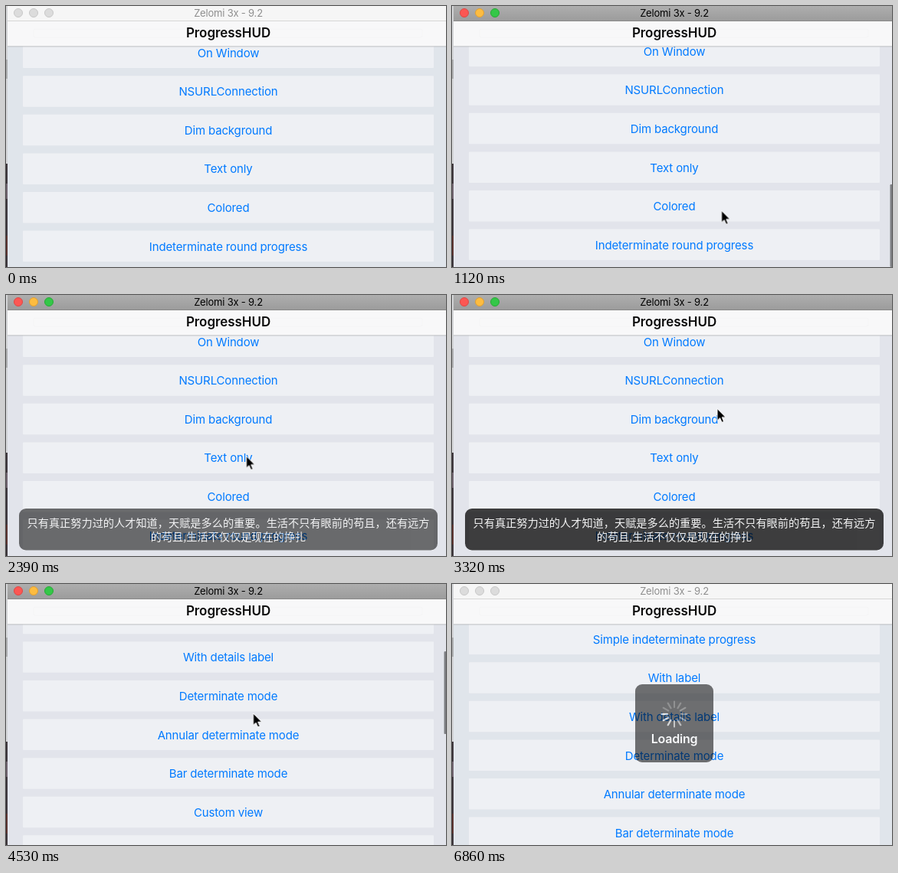
These frames come from a looping animation (574x341 px, 6960 ms). An HTML page:

```html
<!DOCTYPE html>
<html lang="en">
<head>
<meta charset="utf-8">
<title>ProgressHUD</title>
<style>
html, body { margin: 0; width: 100%; height: 100%; overflow: hidden; }
svg { display: block; width: 574px; height: 341px; font-family: Inter, sans-serif; }
text { text-anchor: middle; }
.anim { animation: 6960ms linear infinite; }

#list text { font-size: 15px; letter-spacing: -.14px; fill: #007aff; }
#list rect { fill: #eef0f4; }
#list { animation-name: scroll; }
#bar { animation-name: bar; }
#thumb { animation-name: thumb; }
#cursor { animation-name: cursor; }
#toast { animation-name: toast; }
#loading { animation-name: loading; }
.active { animation-name: active; }
#spinner { animation-name: spin; animation-timing-function: steps(84); }
#spinner line { stroke: #fff; stroke-width: 2.2; stroke-linecap: round; }

.title { font-size: 13px; letter-spacing: -.2px; }
.nav { font-size: 17px; font-weight: 600; letter-spacing: -.06px; fill: #0a0a0a; }
.label { font-size: 16px; font-weight: 600; letter-spacing: -.22px; fill: #fff; }
.zh { font: 14.2px "Noto Sans CJK SC", "Noto Sans CJK", sans-serif; fill: #f4f4f4; }

@keyframes scroll {
  0%, 8.62% { transform: translateY(-466.4px); }
  11.35% { transform: translateY(-468px); }
  13.22% { transform: translateY(-469.5px); animation-timing-function: ease-in-out; }
  20.11% { transform: translateY(-466.4px); }
  58.33% { transform: translateY(-466.4px); animation-timing-function: cubic-bezier(.35,.1,.7,.75); }
  65.09% { transform: translateY(-78px); animation-timing-function: cubic-bezier(.33,.67,.6,1); }
  68.25%, 100% { transform: none; }
}
@keyframes thumb {
  0%, 58.33% { transform: translateY(173px); animation-timing-function: cubic-bezier(.35,.1,.7,.75); }
  65.09% { transform: translateY(28.5px); animation-timing-function: cubic-bezier(.33,.67,.6,1); }
  68.25%, 100% { transform: none; }
}
@keyframes bar {
  0%, 8.62% { opacity: 0; }
  10.06%, 21.55% { opacity: 1; }
  25%, 58.1% { opacity: 0; }
  58.5%, 73.42% { opacity: 1; }
  76.58%, 100% { opacity: 0; }
}
@keyframes cursor {
  0%, 5.6% { transform: translate(470px, 360px); animation-timing-function: ease-out; }
  11.35% { transform: translate(355px, 272.5px); }
  15.37% { transform: translate(352px, 268px); animation-timing-function: ease-in-out; }
  25%, 37.36% { transform: translate(313.5px, 210.5px); animation-timing-function: ease-in-out; }
  44.4%, 51.72% { transform: translate(346px, 148.5px); animation-timing-function: ease-in-out; }
  57.6% { transform: translate(338px, 141px); animation-timing-function: ease-in-out; }
  65.09% { transform: translate(322.5px, 169px); animation-timing-function: ease-in-out; }
  68.25%, 73.42% { transform: translate(321px, 148px); animation-timing-function: ease-in-out; }
  76.58%, 78.6% { transform: translate(315px, 132px); }
  80.89%, 82.9% { transform: translate(315px, 123px); }
  85.2% { transform: translate(349px, 153px); animation-timing-function: ease-out; }
  92.82% { transform: translate(402px, 254px); animation-timing-function: ease-in; }
  95.11%, 100% { transform: translate(430px, 360px); }
}
@keyframes active {
  0%, 8.62% { opacity: 0; }
  8.63%, 96.84% { opacity: 1; }
  96.85%, 100% { opacity: 0; }
}
@keyframes toast {
  0%, 32.33% { opacity: 0; animation-timing-function: ease-in-out; }
  35.6%, 46.98% { opacity: 1; animation-timing-function: ease-in-out; }
  51%, 100% { opacity: 0; }
}
@keyframes loading {
  0%, 83.33% { opacity: 0; animation-timing-function: ease-in-out; }
  87.1%, 97.05% { opacity: 1; }
  98.56%, 100% { opacity: .68; }
}
@keyframes spin {
  from { transform: rotate(330deg); }
  to { transform: rotate(2850deg); }
}
</style>
</head>
<body>
<svg viewBox="0 0 574 341">
  <defs>
    <linearGradient id="chrome" x2="0" y2="1">
      <stop stop-color="#aeaeae"/><stop offset="1" stop-color="#9b9b9b"/>
    </linearGradient>
  </defs>

  <rect width="574" height="341" fill="#e0e5eb"/>
  <rect class="anim active" width="574" height="341" fill="#e2e4eb"/>
  <g id="list" class="anim"></g>
  <g id="bar" class="anim">
    <rect id="thumb" class="anim" x="571.5" y="60" width="3" height="108" rx="1.3" fill="#7d7e82"/>
  </g>

  <rect y="20" width="574" height="32.5" fill="#f8f8f9"/>
  <rect x="36" y="30" width="507" height="11" rx="2" fill="none" stroke="#f5f5f6"/>
  <rect y="52.4" width="574" height="1" fill="#bfc0c3"/>
  <text class="nav" x="290" y="41.3">ProgressHUD</text>

  <rect width="574" height="20" fill="#f6f6f6"/>
  <rect y="19" width="574" height="1" fill="#d6d6d6"/>
  <g fill="#dcdcdc" stroke="#c8c8c8">
    <circle cx="16" cy="9" r="5.5"/><circle cx="36" cy="9" r="5.5"/><circle cx="56" cy="9" r="5.5"/>
  </g>
  <text class="title" x="290" y="14" fill="#8e8e8e">Zelomi 3x - 9.2</text>
  <g class="anim active">
    <rect width="574" height="20" fill="url(#chrome)"/>
    <rect y="19" width="574" height="1" fill="#898989"/>
    <circle cx="16" cy="9" r="5.5" fill="#fc5753" stroke="#df4744"/>
    <circle cx="36" cy="9" r="5.5" fill="#fdbc40" stroke="#de9f34"/>
    <circle cx="56" cy="9" r="5.5" fill="#34c748" stroke="#27aa35"/>
    <text class="title" x="290" y="14" fill="#000">Zelomi 3x - 9.2</text>
  </g>

  <!-- desktop showing beside the window -->
  <rect width="2" height="206" fill="#d2d3d5"/>
  <rect y="70" width="2" height="25" fill="#aaabad"/>
  <rect y="206" width="2" height="135" fill="#3b3439"/>
  <rect y="232" width="2" height="20" fill="#6b5f69"/>
  <rect y="300" width="2" height="26" fill="#57302c"/>

  <g id="toast" class="anim">
    <rect x="17" y="279" width="546" height="54.5" rx="9" fill="#000" fill-opacity=".8"/>
    <text class="zh" lang="zh" x="290" y="303.3">只有真正努力过的人才知道，天赋是多么的重要。生活不只有眼前的苟且，还有远方</text>
    <text class="zh" lang="zh" x="290" y="321">的苟且,生活不仅仅是现在的挣扎</text>
  </g>

  <g id="loading" class="anim">
    <rect x="239" y="131" width="102" height="102" rx="9" fill="#000" fill-opacity=".8"/>
    <g transform="translate(290 170)"><g id="spinner" class="anim"></g></g>
    <text class="label" x="290" y="208.4">Loading</text>
  </g>

  <path id="cursor" class="anim" d="M0 0V15.5L3.6 12.2L6 17.8L8.6 16.7L6.2 11.2H11Z" fill="#000" stroke="#fff"/>
</svg>
<script>
const labels = [
  'Simple indeterminate progress', 'With label', 'With details label', 'Determinate mode',
  'Annular determinate mode', 'Bar determinate mode', 'Custom view', 'Mode switching',
  'Using blocks', 'On Window', 'NSURLConnection', 'Dim background', 'Text only', 'Colored',
  'Indeterminate round progress'
];

function add(parent, tag, attrs, text = '') {
  const el = document.createElementNS('http://www.w3.org/2000/svg', tag);
  for (const key in attrs) el.setAttribute(key, attrs[key]);
  el.textContent = text;
  parent.append(el);
}

const list = document.getElementById('list');
labels.forEach((label, i) => {
  const y = 72 + i * 50.6;
  add(list, 'rect', { x: 22, y: y - 20.4, width: 536, height: 40.5, rx: 1 });
  add(list, 'text', { x: 290, y: y + 5.7 }, label);
});

const spinner = document.getElementById('spinner');
for (let i = 0; i < 12; i++) {
  add(spinner, 'line', {
    y1: -9, y2: -16.5, transform: `rotate(${-30 * i})`, opacity: Math.max(.25, .9 - i * .085)
  });
}
</script>
</body>
</html>
```
